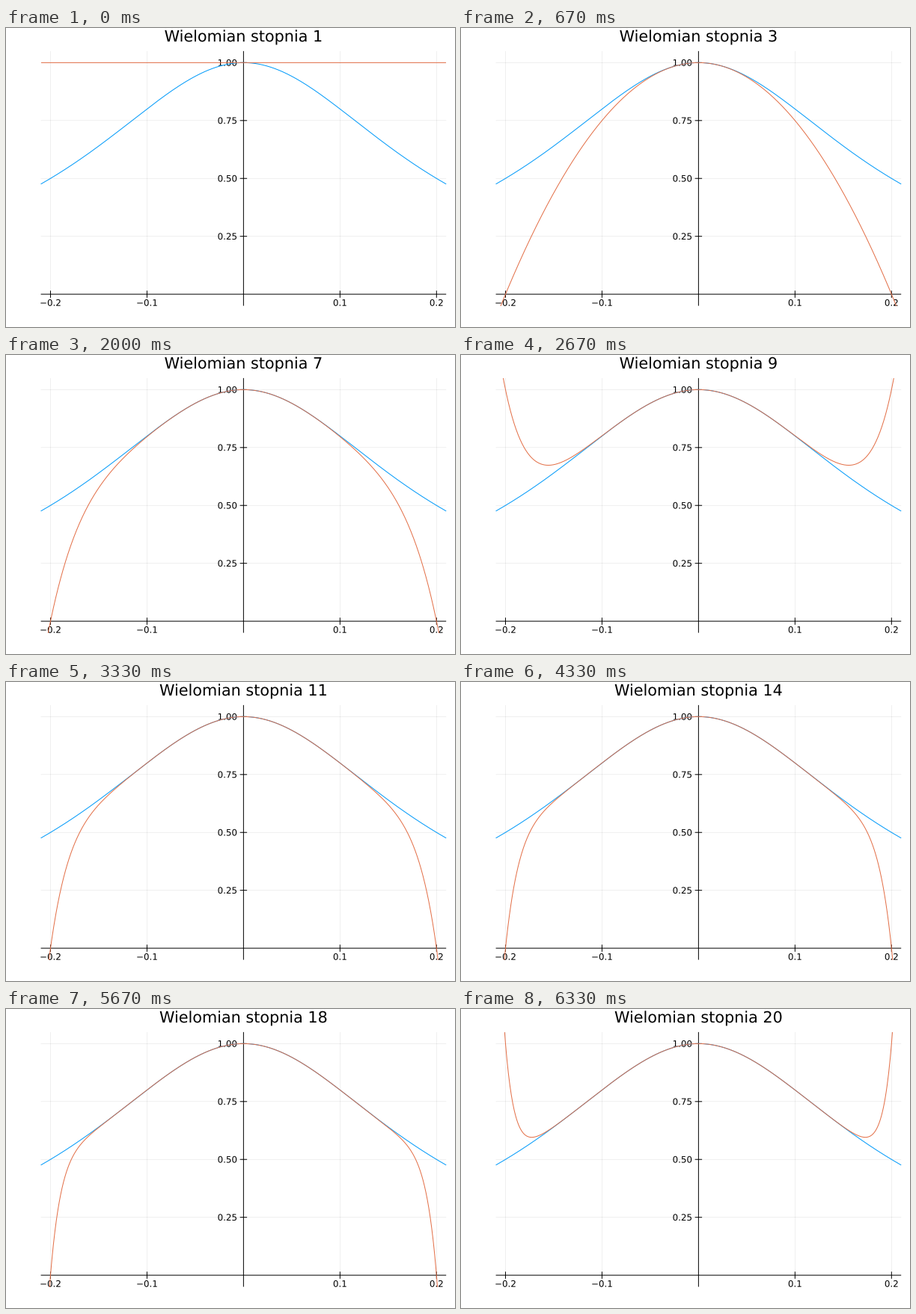
A matplotlib script for the animation above (6.66 s loop, 600 by 400 pixels).

```python
import matplotlib
import matplotlib.pyplot as plt
import numpy as np
from matplotlib.animation import FuncAnimation
from matplotlib.patches import PathPatch, Rectangle
from matplotlib.textpath import TextPath
from matplotlib.transforms import Affine2D

matplotlib.rcParams["font.family"] = "DejaVu Sans"

W, H, DPI = 600, 400, 100
PX = 72 / DPI  # points per pixel
LEFT, RIGHT, TOP, BOTTOM = 46.57, 588.19, 30.87, 371.61
XLIM, YLIM = (-0.21, 0.21), (-0.05, 1.05)
TICK = 4.72
TITLE_SIZE, LABEL_SIZE = 20.74, 11.85
BLUE, ORANGE = "#009AFA", "#E36F47"
DEGREES = 20


def sx(x):
    return LEFT + (x - XLIM[0]) / (XLIM[1] - XLIM[0]) * (RIGHT - LEFT)


def sy(y):
    return BOTTOM - (y - YLIM[0]) / (YLIM[1] - YLIM[0]) * (BOTTOM - TOP)


def text_width(s, size):
    """Advance width, found by appending one more digit."""
    end = TextPath((0, 0), s + "0", size=size).get_extents().x1
    return end - TextPath((0, 0), "0", size=size).get_extents().x1


def text_path(s, x, baseline, size, align):
    """Glyph outlines in stage pixels; align is 0.5 for centre, 1 for right."""
    x -= align * text_width(s, size)
    path = TextPath((0, 0), s, size=size)
    return path.transformed(Affine2D().scale(1, -1).translate(x, baseline))


def add_text(*args):
    patch = PathPatch(text_path(*args), fc="black", lw=0, snap=False, zorder=3)
    return ax.add_patch(patch)


def add_line(x, y, color="black", width=1.0, **kw):
    line, = ax.plot(x, y, color=color, lw=width * PX, snap=False,
                    solid_capstyle="butt", solid_joinstyle="round", **kw)
    return line


def taylor(x, degree):
    """Partial Taylor sum of 1 / (1 + 25 x^2) around zero."""
    return sum((-25 * x**2) ** k for k in range(degree // 2 + 1))


fig = plt.figure(figsize=(W / DPI, H / DPI), dpi=DPI, facecolor="white")
ax = fig.add_axes([0, 0, 1, 1])
ax.set_xlim(0, W)
ax.set_ylim(H, 0)
ax.axis("off")

x0, y0 = sx(0), sy(0)

for v in (-0.2, -0.1, 0.1, 0.2):
    px = sx(v)
    add_line([px, px], [TOP, BOTTOM], width=0.6, alpha=0.1, zorder=1)
    add_line([px, px], [y0 - TICK, y0 + TICK], zorder=2)
    label = f"{v:.1f}".replace("-", "\u2212")
    add_text(label, px, y0 + 15.6, LABEL_SIZE, 0.5)

for v in (0.25, 0.5, 0.75, 1.0):
    py = sy(v)
    add_line([LEFT, RIGHT], [py, py], width=0.6, alpha=0.1, zorder=1)
    add_line([x0 - TICK, x0 + TICK], [py, py], zorder=2)
    add_text(f"{v:.2f}", 309, py + 4.32, LABEL_SIZE, 1)

add_line([LEFT, RIGHT], [y0, y0], zorder=2)
add_line([x0, x0], [TOP, BOTTOM], zorder=2)

xs = np.linspace(*XLIM, 841)
add_line(sx(xs), sy(1 / (1 + 25 * xs**2)), BLUE, zorder=4)
approx = add_line(sx(xs), sy(taylor(xs, 1)), ORANGE, zorder=5)
approx.set_clip_path(Rectangle((LEFT, TOP), RIGHT - LEFT, BOTTOM - TOP,
                               transform=ax.transData))


def title_path(degree):
    return text_path(f"Wielomian stopnia {degree}", (LEFT + RIGHT) / 2,
                     18.14, TITLE_SIZE, 0.5)


title = ax.add_patch(PathPatch(title_path(1), fc="black", lw=0, snap=False))


def update(i):
    degree = i + 1
    approx.set_ydata(sy(taylor(xs, degree)))
    title.set_path(title_path(degree))
    return approx, title


anim = FuncAnimation(fig, update, frames=DEGREES, interval=333, repeat=True,
                     repeat_delay=0, blit=False)
plt.show()
```
